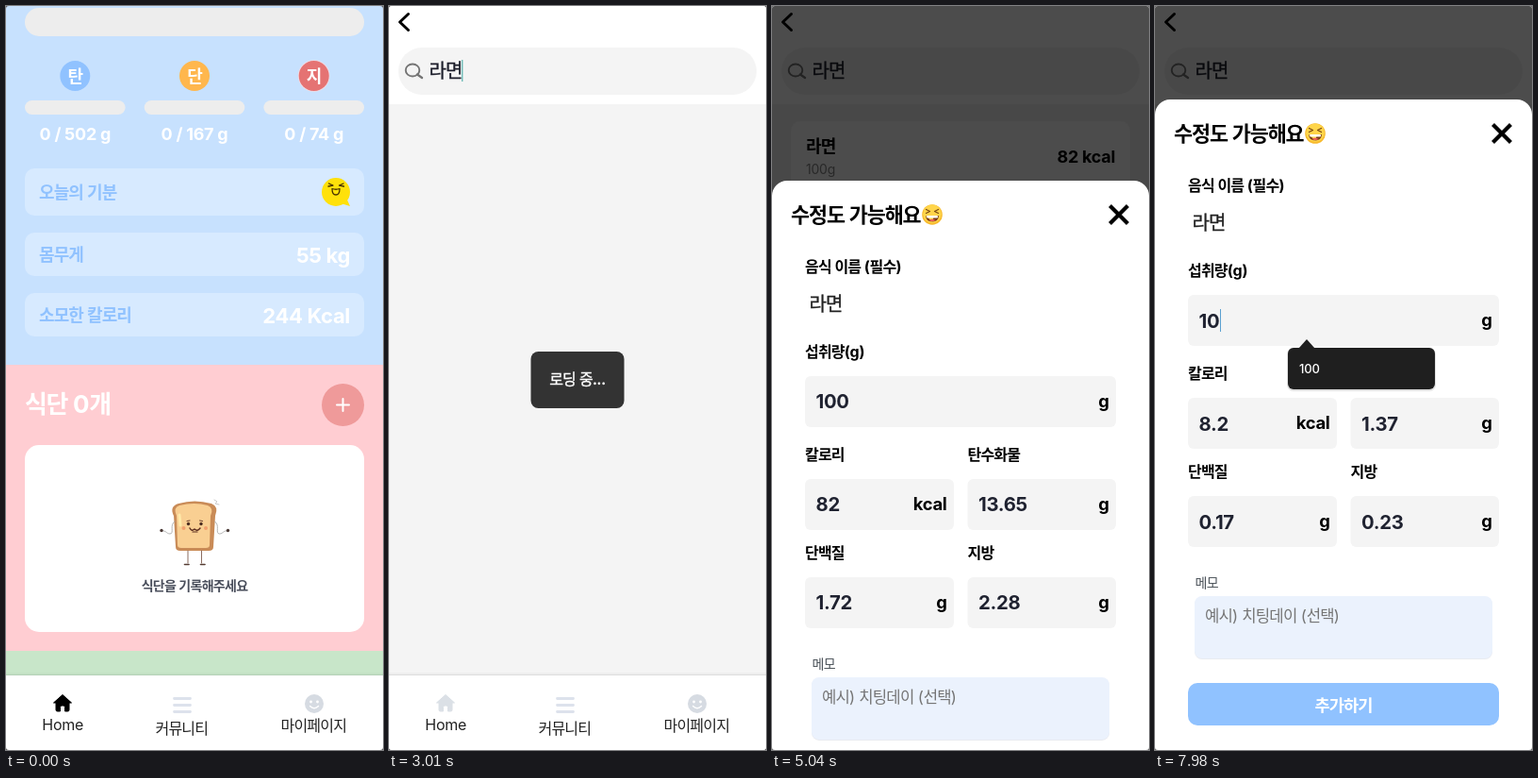
Write an HTML page that moves like this. It is 400x788 px and loops after 8000 ms.

```html
<!DOCTYPE html>
<html lang="ko">
<head>
<meta charset="utf-8">
<title>식단 기록</title>
<style>
html, body { margin: 0; width: 100%; height: 100%; overflow: hidden; background: #555; }
svg { display: block; width: 400px; height: 788px; border-radius: 3px; }
text { font-family: Inter, 'Noto Sans CJK KR', 'Noto Sans CJK', sans-serif; white-space: pre; }
</style>
</head>
<body>
<svg id="stage" viewBox="0 0 400 788" xmlns="http://www.w3.org/2000/svg"></svg>
<script>
const LOOP = 8000;
const SHEET_TOP = 99, SHEET_HEIGHT = 689;
const SKY = '#90c2ff', GREY = '#f4f4f4', PALE = '#d6eafe';

const rect = (x, y, w, h, fill, r = 0) =>
  `<rect x="${x}" y="${y}" width="${w}" height="${h}" rx="${r}" fill="${fill}"/>`;
const disc = (x, y, r, fill) => `<circle cx="${x}" cy="${y}" r="${r}" fill="${fill}"/>`;
const line = (d, color, width = 1, cap = 'round') =>
  `<path d="${d}" fill="none" stroke="${color}" stroke-width="${width}" stroke-linecap="${cap}" stroke-linejoin="round"/>`;
const shape = (d, fill) => `<path d="${d}" fill="${fill}"/>`;
const group = (id, body) => `<g id="${id}">${body}</g>`;

// y is the vertical middle of the glyphs; Hangul is set tighter than Latin
function label(s, x, y, size, fill, weight = 700, anchor = 'start', id = '') {
  const hangul = /[가-힣]/.test(s), latin = -0.015 * size;
  const body = hangul ? s.replace(/[^가-힣]+/g, `<tspan letter-spacing="${latin}">$&</tspan>`) : s;
  // a hairline outline gives Hangul its medium weight
  const medium = hangul && weight === 500 ? `stroke="${fill}" stroke-width="0.35"` : '';
  return `<text ${id && `id="${id}"`} x="${x}" y="${y + size * 0.37}" font-size="${size}" fill="${fill}" ` +
    `font-weight="${weight}" text-anchor="${anchor}" letter-spacing="${hangul ? -0.05 * size : latin}" ${medium}>${body}</text>`;
}

function nutrient(name, x, color, amount) {
  return disc(x, 74, 16, color) + label(name, x, 74, 18, '#fff', 700, 'middle') +
    rect(x - 53.3, 100, 106.6, 15, '#ededed', 7.5) +
    label(amount, x, 135.5, 18, '#fff', 700, 'middle');
}

function infoRow(name, y, h, value = '') {
  const mid = y + h / 2;
  return rect(20, y, 360, h, '#d7eaff', 10) + label(name, 35, mid, 18, SKY) +
    label(value, 365, mid + 0.5, 22, '#fff', 700, 'end');
}

function toast() {
  const arm = 'M179 546C173 549 179 559 174 559C170 559 170 555 165 556';
  const half = line(arm, '#aaa', 0.9) + disc(165, 555.5, 1.7, '#4a3a36') +
    line('M193 577V590', '#8b6d60', 1) + line('M189.5 591.5H194', '#553c33', 1.6) +
    line('M192 545.5l3 -.5', '#6b4030', 1) + disc(193.5, 548.5, 1.7, '#4a2c20') +
    disc(188.5, 553, 2, '#f2a06e');
  return shape('M183 527Q200 522 218 527Q226 530 222 540L220 573Q220 577 215 577H185Q180 577 180 573L178 540Q173 530 183 527Z', '#c98b57') +
    shape('M184 529Q200 525 214 529Q221 532 217 540L216 571Q216 574 212 574H186Q182 574 182 571L181 540Q177 531 184 529Z', '#f9cf92') +
    line('M184 539l1 11', '#ffe9a8', 3) +
    half + `<g transform="translate(400.5 0) scale(-1 1)">${half}</g>` +
    line('M195 553Q197 557 200 554Q203 557 206 553', '#5b2c1d', 1.4) + line('M198 557H203', '#5b2c1d', 1.2) +
    line('M221 523l3 2l-2 2l4 1', '#c9c9c9', 1);
}

function home() {
  const bubble = disc(350, 197, 15, '#ffe10a') + shape('M355 209L365 212L361 203Z', '#ffe10a') +
    line('M342.5 188l4.5 2l-5 1M358 188l-4.5 2l5 1', '#4a3500', 1.3) +
    line('M346 193.5Q350 195 354 193.5Q354 200 350 200Q346 200 346 193.5Z', '#4a3500', 1.3);
  return rect(0, 0, 400, 380, '#c7e1fe') + rect(20, 2, 360, 30, '#ededed', 15) +
    nutrient('탄', 73.3, SKY, '0 / 502 g') +
    nutrient('단', 200, '#ffb74d', '0 / 167 g') +
    disc(326.7, 74, 16.8, '#f4dbe2') + nutrient('지', 326.7, '#e57373', '0 / 74 g') +
    infoRow('오늘의 기분', 172, 50) + bubble +
    infoRow('몸무게', 240, 46, '55 kg') +
    infoRow('소모한 칼로리', 304, 46, '244 Kcal') +
    rect(0, 380, 400, 304, '#ffcdd2') + rect(0, 683, 400, 40, '#c8e6c9') +
    label('식단 0개', 20, 421, 26, '#fff') +
    disc(357.5, 422.5, 22.5, '#ef9a9a') + line('M351 422.5H364M357.5 416V429', '#fff', 2) +
    rect(20, 465, 360, 198, '#fff', 15) + toast() +
    label('식단을 기록해주세요', 200, 614, 14, '#4a4f5c', 700, 'middle');
}

function navBar() {
  const icon = '#dde2ec', face = '#d6dbe2';
  return rect(0, 706, 400, 3, 'rgba(0,0,0,.025)') + rect(0, 708, 400, 1, 'rgba(0,0,0,.07)') +
    rect(0, 709, 400, 79, '#fff') +
    `<path id="house" d="M60 729.5L69.5 738H67V745.5Q67 747 65.5 747H62.5V742.5Q62.5 741 61 741H59Q57.5 741 57.5 742.5V747H54.5Q53 747 53 745.5V738H50.5Z" stroke-width="1" stroke-linejoin="round"/>` +
    line('M178.5 733.5H195.5M178.5 740.5H195.5M178.5 747.5H195.5', icon, 2.8) +
    disc(327, 739, 10, face) + disc(323.5, 737, 1.4, '#fff') + disc(330.5, 737, 1.4, '#fff') +
    line('M322.5 741.5Q327 746 331.5 741.5', '#fff', 1.4) +
    label('Home', 38.3, 761.5, 16, '#222', 400) +
    label('커뮤니티', 158.5, 765.5, 16, '#222', 400) +
    label('마이페이지', 291.5, 762.5, 16, '#222', 400);
}

function header() {
  return rect(0, 0, 400, 104, '#fff') + rect(10, 44, 380, 50, GREY, 25) +
    line('M20.5 8.5L11.5 17L20.5 25.5', '#000', 3) +
    `<ellipse cx="25" cy="68" rx="7.3" ry="6.5" fill="none" stroke="#757575" stroke-width="1.9"/>` +
    line('M30 72.5L35 76', '#757575', 2.4) +
    label('어떤 음식을 드셨나요?', 42, 69.5, 20, '#757575', 500, 'start', 'hint') +
    label('라면', 42.5, 68.5, 20, '#1c1e2b', 500, 'start', 'query') +
    `<rect id="caret" y="57" width="1" height="23" fill="#3aa6a0"/>`;
}

function freeInput() {
  return rect(181, 119, 152, 40, PALE, 20) + shape('M328 125L343 139L328 153Z', PALE) +
    label('검색없이 자유 입력!', 196, 138.5, 16, '#4a5568') +
    disc(365, 139, 20, PALE) +
    `<g transform="translate(365 139) rotate(45)" fill="#339af0">` +
    `<path d="M-4 -7H4V7L0 14L-4 7Z"/><path d="M-4 -8.5V-11Q-4 -13 -2 -13H2Q4 -13 4 -11V-8.5Z"/>` +
    `<path d="M-1 -4V6" stroke="#d6eafe" stroke-width="1.2"/><path d="M-1.8 8.5H1.8L0 11.5Z" fill="#d6eafe"/></g>`;
}

function food(y, name, kcal, extra = '') {
  const shift = extra ? 22 : 0;
  let out = rect(20, y, 360, 75 + shift, '#fff', 10) +
    label(name, 36, y + 26.5, 18, '#000') + label(extra, 36, y + 48.5, 18, '#000') +
    label('100g', 36, y + 51 + shift, 14, '#868686', 400);
  if (extra) out += label(kcal, 303, y + 38.5, 18, '#000') + label('kcal', 303, y + 59.5, 18, '#000');
  else out += label(kcal + ' kcal', 364, y + 37.5, 18, '#000', 700, 'end');
  return out;
}

function results() {
  return group('picked', food(122, '라면', 82)) + food(212, '라면_달걀', 108) + food(300, '라면_떡', 96) +
    food(388, '라면_간편조리세트_새콤탕두루라', 88, '면') +
    food(498, '라면_국물', 19) + food(586, '라면_김치', 79) + food(674, '라면_만두', 104);
}

function field(name, x, y, w, unit, id) {
  return label(name, x, y - 26, 16, '#000') + rect(x, y, w, 54, GREY, 6) +
    label('0', x + 11.5, y + 27, 20.3, '#1f2230', 700, 'start', id) +
    label(unit, x + w - 7.5, y + 26, 18.4, '#000', 700, 'end');
}

function grin() {
  return disc(170, 36, 10.8, '#f7b92c') + disc(170, 35.2, 9.8, '#ffd54a') +
    line('M163.5 30.5l4 2l-4 2M176.5 30.5l-4 2l4 2', '#7a4a14', 1.2) +
    shape('M163 37H177Q176.5 43.5 170 43.5Z M163 37Q163.5 43.5 170 43.5L172 37Z', '#7a3d18') +
    rect(164, 37, 12, 2.6, '#fff', 1) + shape('M166.5 42Q170 39.5 173.5 42Q170 44.2 166.5 42Z', '#f0605a');
}

// laid out from the sheet's own top edge
function sheet() {
  return rect(0, 0, 400, 720, '#fff', 16) +
    label('수정도 가능해요', 20, 36, 21.8, '#000') + grin() +
    line('M360 28L376 44M376 28L360 44', '#000', 4.2, 'square') +
    label('음식 이름 (필수)', 35, 91.5, 16, '#000') + label('라면', 39.5, 131, 20, '#222', 500) +
    field('섭취량(g)', 35, 207, 330, 'g', 'grams') +
    field('칼로리', 35, 316, 158, 'kcal', 'kcal') + field('탄수화물', 207.5, 316, 157.5, 'g', 'carbs') +
    field('단백질', 35, 420, 158, 'g', 'protein') + field('지방', 207.5, 420, 157.5, 'g', 'fat') +
    label('메모', 42.5, 512, 14, '#495057', 400) +
    rect(42, 527, 316, 66, '#e9ebf0', 8) + rect(42, 526, 316, 66, '#ebf2fd', 8) +
    label('예시) 치팅데이 (선택)', 53, 547, 16.7, '#757575', 400) +
    rect(35, 618, 330, 45, SKY, 10) + label('추가하기', 200, 641, 17.6, '#fff', 700, 'middle') +
    `<rect id="gramCaret" y="222" width="1" height="24" fill="#5aa0d0"/>` +
    group('suggest', rect(140, 263, 158, 46, 'rgba(0,0,0,.12)', 7) + rect(141, 263, 156, 44, '#1f1f1f', 6) +
      shape('M152.5 263.5L161 254L169.5 263.5Z', '#1f1f1f') + label('100', 153, 285.5, 13, '#fff', 500));
}

document.getElementById('stage').innerHTML =
  group('home', home()) +
  group('search', rect(0, 0, 400, 788, GREY) + group('free', freeInput()) +
    group('results', results()) + header() +
    group('loading', rect(150.5, 366, 99, 60, '#333', 8) +
      label('로딩 중...', 200, 395, 16, '#fff', 500, 'middle'))) +
  navBar() +
  group('dim', rect(0, 0, 400, 788, 'rgba(0,0,0,.7)')) +
  group('tap', rect(20, 122.5, 360, 74.5, 'rgba(51,181,229,.4)')) +
  group('sheet', sheet());

const $ = id => document.getElementById(id);
const show = (id, on) => $(id).setAttribute('display', on ? 'inline' : 'none');
const setText = (id, s) => { if ($(id).textContent !== s) $(id).textContent = s; };

const typing = [[2030, 'ㄹ'], [2100, '라'], [2170, '람'], [2240, '라며'], [2380, '라면']];
// critically damped
const spring = s => s <= 0 ? 0 : 1 - (1 + 18.8 * s) * Math.exp(-18.8 * s);
const within = (t, a, b) => t >= a && t < b;

function draw(t) {
  const searching = t >= 420;
  show('home', !searching);
  show('search', searching);
  $('house').setAttribute('fill', searching ? '#dbe0e6' : '#000');
  $('house').setAttribute('stroke', searching ? '#dbe0e6' : '#000');

  const query = typing.reduce((q, [at, s]) => t >= at ? s : q, '');
  setText('query', query);
  show('hint', !query);
  show('caret', within(t, 1470, 3570));
  $('caret').setAttribute('x', 42.5 + query.length * 17.4);

  show('free', t < 2590);
  show('loading', within(t, 2800, 3570));
  show('results', t >= 3570);

  const tapped = within(t, 4760, 5040);
  show('tap', tapped);
  $('picked').setAttribute('opacity', tapped ? 0.5 : 1);
  show('dim', t >= 4830);
  const rise = t >= 5390 ? 1 : spring((t - 4849) / 1000);
  show('sheet', rise > 0);
  $('sheet').setAttribute('transform', `translate(0 ${SHEET_TOP + SHEET_HEIGHT * (1 - rise)})`);

  const edited = t >= 7980;
  const values = edited ? ['10', '8.2', '1.37', '0.17', '0.23'] : ['100', '82', '13.65', '1.72', '2.28'];
  ['grams', 'kcal', 'carbs', 'protein', 'fat'].forEach((id, i) => setText(id, values[i]));
  show('gramCaret', t >= 6860);
  $('gramCaret').setAttribute('x', edited ? 69 : 82.5);
  show('suggest', edited);
}

function tick() {
  draw(performance.now() % LOOP);
  requestAnimationFrame(tick);
}
tick();
</script>
</body>
</html>
```
